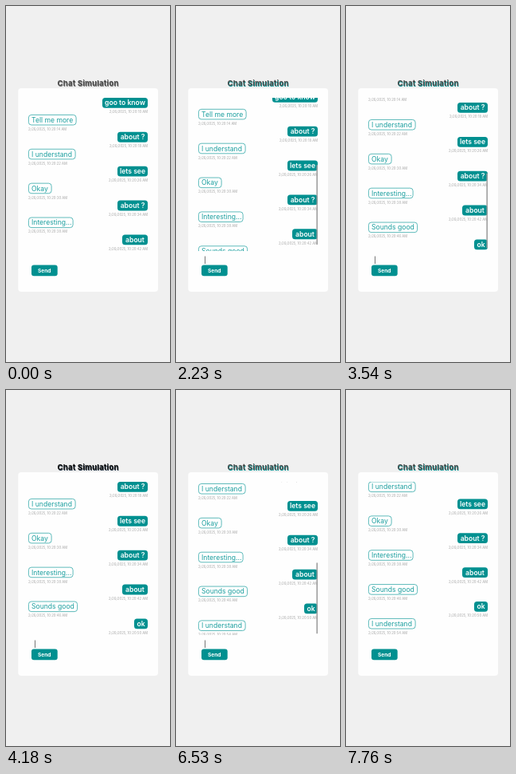
Write an HTML page that moves like this. It is 206x446 px and loops after 7.78 s.

```html
<!DOCTYPE html>
<html lang="en">
<head>
<meta charset="utf-8">
<title>Chat Simulation</title>
<style>
html, body { margin: 0; height: 100%; overflow: hidden; background: #f0f0f0; }
svg { display: block; font-family: Inter, "Open Sans", sans-serif; }
.title { font-size: 9.6px; font-weight: 700; letter-spacing: .2px; text-anchor: middle; }
.msg { font-size: 8.6px; }
.sent { font-weight: 600; text-anchor: middle; }
.stamp { font-size: 4.2px; font-weight: 500; fill: #b4b4b4; }
.send { font-size: 6.6px; font-weight: 700; fill: #fff; text-anchor: middle; }
</style>
</head>
<body>
<svg width="206" height="446" viewBox="0 0 206 446">
  <clipPath id="view"><rect x="20" y="115" width="166" height="192"/></clipPath>
  <rect x="15.3" y="103" width="175.7" height="255" rx="4" fill="#fefefe"/>
  <text class="title" id="shade" x="103.6" y="100.5">Chat Simulation</text>
  <text class="title" id="title" x="103" y="100">Chat Simulation</text>
  <g clip-path="url(#view)">
    <g id="list"></g>
    <rect id="thumb" x="176.4" width="1.5" rx=".7" fill="#999"/>
  </g>
  <rect id="caret" x="36" y="313.5" width="1" height="9.5" fill="#777"/>
  <rect x="32" y="324.5" width="32.7" height="13.8" rx="3" fill="#009090"/>
  <text class="send" x="48.2" y="333.5">Send</text>
</svg>
<script>
const LOOP = 7780, ROW = 21.43, TEAL = '#009090', INK = '#1a9e9e';
const $ = id => document.getElementById(id);

// [text, bubble width], alternating sent (right) and received (left)
const messages = [
  ['goo to know', 57], ['Tell me more', 60.5], ['about ?', 38], ['I understand', 59.5],
  ['lets see', 38], ['Okay', 29.5], ['about ?', 38], ['Interesting...', 56.5],
  ['about', 32], ['Sounds good', 62], ['ok', 17], ['I understand', 59.5]
];

// start and length of each scroll, start of the scrollbar fade, thumb height
const scrolls = [
  { at: 2200, len: 170, fade: 2620, size: 100 },
  { at: 3480, len: 130, fade: 3900, size: 94 },
  { at: 6465, len: 100, fade: 6870, size: 89 }
];
const FADE = 280;
const blinks = [120, 630, 1150, 1680, 2210, 2740, 3060, 3580,
                4110, 4630, 5160, 5680, 6200, 6730, 7230, 7760];

function add(tag, attrs, text = '') {
  const el = document.createElementNS('http://www.w3.org/2000/svg', tag);
  for (const k in attrs) el.setAttribute(k, attrs[k]);
  el.textContent = text;
  $('list').append(el);
}

messages.forEach(([text, w], i) => {
  const sent = i % 2 === 0;
  const y = 121.3 + i * ROW;
  const x = sent ? 178 - w : 28;
  add('rect', sent
    ? { x, y: y - 6.3, width: w, height: 12.8, rx: 3.5, fill: TEAL }
    : { x: x + .4, y: y - 6.3, width: w - .8, height: 12.6, rx: 3.5,
        fill: '#fff', stroke: INK, 'stroke-width': .7 });
  add('text', { class: sent ? 'msg sent' : 'msg', x: sent ? x + w / 2 : 32, y: y + 3.1,
                fill: sent ? '#fff' : INK }, text);
  const sec = String(10 + i * 4).padStart(2, '0');
  add('text', { class: 'stamp', x: sent ? 178 : 28, y: y + 13.1,
                'text-anchor': sent ? 'end' : 'start' }, `2/26/2025, 10:20:${sec} AM`);
});

const clamp = v => Math.max(0, Math.min(1, v));

function draw(t) {
  let offset = 0, alpha = 0, top = 0, size = 0;
  for (const s of scrolls) {
    if (t < s.at) break;
    const left = (1 - clamp((t - s.at) / s.len)) ** 2;
    offset += ROW * (1 - left);
    alpha = 1 - clamp((t - s.fade) / FADE);
    size = s.size;
    top = 306.5 - size - left * ROW * size / 192;
  }
  $('list').setAttribute('transform', `translate(0 ${-offset})`);
  $('thumb').setAttribute('y', top);
  $('thumb').setAttribute('height', size);
  $('thumb').setAttribute('opacity', alpha);
  $('caret').setAttribute('opacity', blinks.filter(b => b <= t).length % 2);

  const crisp = t >= 4180 && t < 6470;
  $('title').setAttribute('fill', crisp ? '#111' : '#4a4a4a');
  $('shade').setAttribute('fill', t < 2210 ? '#777' : crisp ? '#234' : TEAL);
}

const start = performance.now();
function tick() {
  draw((performance.now() - start) % LOOP);
  requestAnimationFrame(tick);
}
tick();
</script>
</body>
</html>
```
